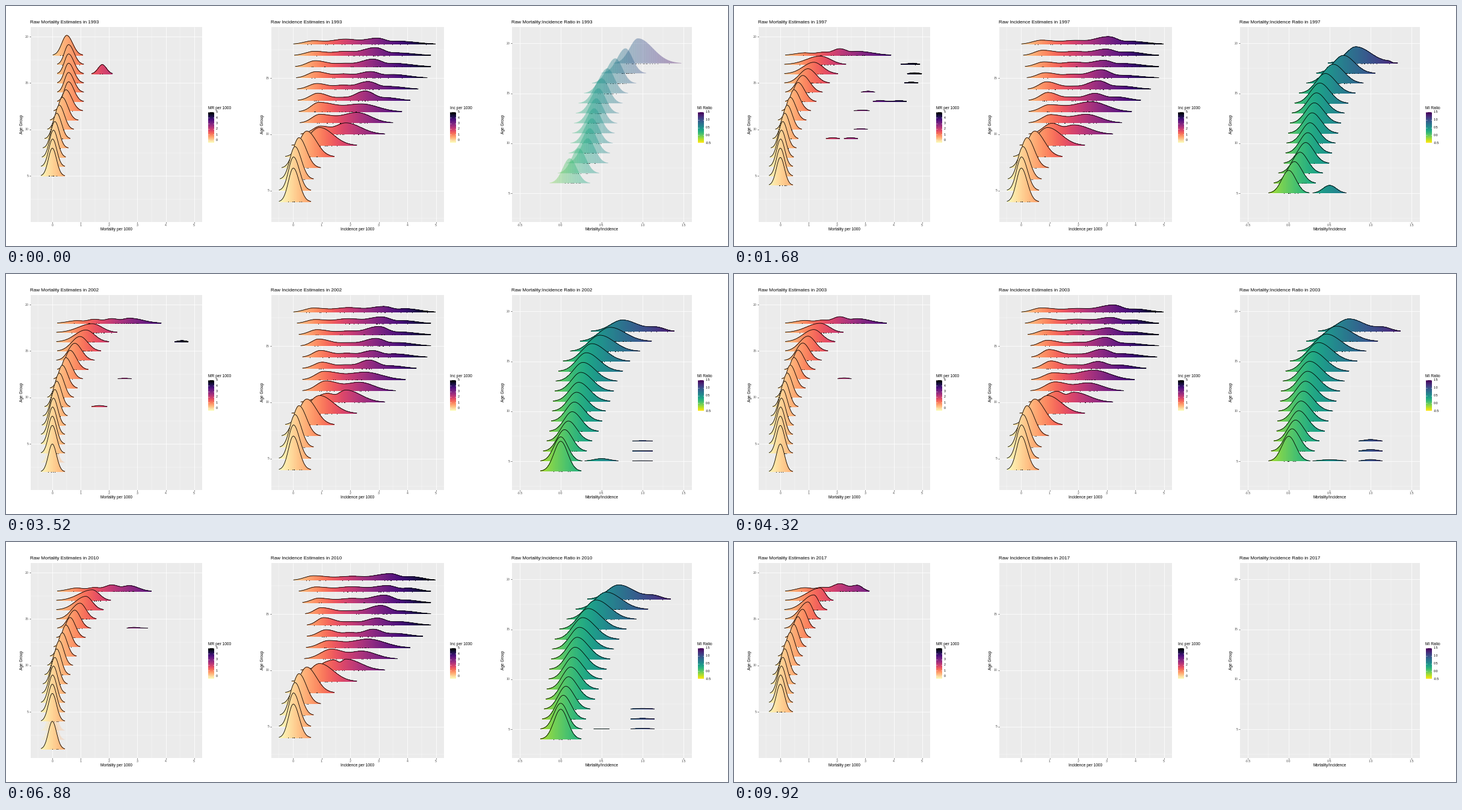
Write a matplotlib script that moves like this. It is 1200x400 px and loops after 10 s.

```python
import numpy as np
import matplotlib
import matplotlib.pyplot as plt
from matplotlib.animation import FuncAnimation
from matplotlib.collections import LineCollection, PolyCollection
from matplotlib.patches import Rectangle

W, H, DPI = 1200, 400, 100
FRAMES, INTERVAL = 125, 80
FIRST, LAST = 1993, 2017
CUT = 0.03  # ridge heights below this are not drawn
TOP, BOTTOM = 35, 360
PT = 72 / DPI
plt.rcParams["font.family"] = "Liberation Sans"

fig = plt.figure(figsize=(W / DPI, H / DPI), dpi=DPI, facecolor="white")
ax = fig.add_axes([0, 0, 1, 1])
ax.axis("off")


def ridge(xs, left, peaks, right):
    """Smooth ridge between two ends through (x, height) peaks; x in stage pixels."""
    total = np.zeros_like(xs)
    for i, (x, h) in enumerate(peaks):
        tail = np.sqrt(2 * np.log(max(h, 0.05) / CUT))
        s_left = 0.45 * (x - peaks[i - 1][0]) if i else (x - left) / tail
        s_right = 0.45 * (peaks[i + 1][0] - x) if i < len(peaks) - 1 else (right - x) / tail
        d = xs - x
        total += (h * np.exp(-0.5 * (d / np.where(d < 0, s_left, s_right)) ** 2)) ** 2
    return np.sqrt(total)


def island(x, h, half=12):
    return x - half, [(x, h)], x + half


def ramp(year, start, end):
    return np.clip((year - start) / (end - start), 0, 1)


def wobble(age, year, k=0, size=0.15):
    """Smooth, repeatable variation from year to year."""
    return 1 + size * np.sin(1.7 * age + 2.3 * k + 0.9 * (year - FIRST))


rng = np.random.default_rng(11)
OUTLIERS = [(age, 1996 + rng.exponential(4), min(125 + 14 * (age - 8) + 80 * rng.random(), 300))
            for age in rng.integers(8, 18, 40)]


def mortality(age, year):
    q = max(age - 5, 0) ** 2
    settled, late = ramp(year, 1993, 1997), ramp(year, 2000, 2017)

    def limit(value, cap):  # the first year shows little spread at high ages
        return min(value, cap) + settled * max(value - cap, 0)

    left = 57 + min(0.45 * q, 27)
    peak = 77 + limit(0.46 * q, 27)
    right = 98 + limit((0.62 - 0.15 * late) * q, 32)
    fall = (0.0145 - 0.003 * late) * q
    height = 3 - limit(fall, 0.85)
    parts = [island(x, 0.15 * (1 - abs(year - born)))
             for a, born, x in OUTLIERS if a == age and abs(year - born) < 1]
    if age == 16:
        parts.append(island(160, 1 - settled, 18))
    if age < 18:
        return parts + [(left, [(peak, height)], right)]
    spread = [(118 + 29 * k, settled * h * wobble(age, year, k, 0.2) * (1 + 0.3 * late))
              for k, h in enumerate((0.25, 0.4, 0.6, 0.45))]
    return parts + [(77, [(101, 2.15 * (1 - settled))], 129), (85, spread, 262 - 36 * late)]


def incidence(age, year):
    cube = (age - 4) ** 3
    if age < 10:
        return [(453 + 0.17 * cube, [(477.5 + 0.35 * cube, 3 - 0.0112 * cube)],
                 507 + 0.62 * cube)]
    u, f = ramp(year, 1993, 2012), (age - 10) / 8
    root = np.sqrt(f)
    left = 490 - 12 * f + 18 * u * np.sin(np.pi * f)
    right = min(630 + (age - 10) * (14 + 8 * u), 706 + 8 * (age == 18))
    low, high = 523 + 25 * u * (1 - f) - 12 * f, 565 + 52 * root + 25 * u * root
    peaks = [(low, 0.85 - 0.5 * f), (high, 0.95 - 0.35 * root)]
    if f > 0.3:
        peaks.insert(1, ((low + high) / 2, 0.25 + 0.15 * f))
        peaks.append((min(high + 36, right - 30), 0.28))
    return [(left, [(x, h * wobble(age, year, k)) for k, (x, h) in enumerate(peaks)], right)]


def ratio(age, year):
    d = max(age - 5, 0)
    bend = max(d - 8, 0) ** 2
    spread = ramp(year, 1994, 2000)
    shift = 34 * np.exp(-(year - FIRST) / 6) * min(d / 3, 1)
    peak = 922 + 3.6 * d + 1.9 * bend + shift
    level = np.interp(year, (1993, 1997, 2000, 2007), (2.5, 2.05, 1.8, 2.2))
    height = level - 0.03 * bend * spread
    height += (3 - level) * np.exp(-0.7 * (age - 4)) * spread
    left = peak - 34 - 1.4 * d * (0.4 + 0.6 * spread)
    right = peak + 35 + 2.9 * d * spread
    peaks = [(peak, height)]
    if age == 18:
        peaks.append((peak + 55, 0.45 * spread))
        right += 14 * spread
    parts = [(left, peaks, right)]
    if age == 5:
        parts.append(island(990, 0.8 * np.exp(-max(year - 1997, 0) / 4), 28))
    if 5 <= age <= 7:
        parts.append(island(1058, 0.17 * ramp(year, 2001, 2003) * (1 - 0.5 * ramp(year, 2004, 2007)), 20))
    return parts


class Panel:
    def __init__(self, left, right, x0, x_unit, y5, y_unit, parts, spans, ages, cmap, limits):
        self.left, self.right = left, right
        self.x0, self.x_unit, self.y5, self.y_unit = x0, x_unit, y5, y_unit
        self.parts, self.spans, self.ages, self.limits = parts, spans, ages, limits
        self.cmap = matplotlib.colormaps[cmap]
        lo, hi = limits
        self.xs = np.arange(left, self.px(hi) + 1, 1.5)
        self.colors = self.cmap(((self.xs - x0) / x_unit - lo) / (hi - lo))
        dots = np.random.default_rng(4)
        self.samples = {a: dots.random(2 + a) for a in ages}

    def px(self, x):
        return self.x0 + x * self.x_unit

    def py(self, y):
        return self.y5 - (y - 5) * self.y_unit

    def alpha(self, age, year):
        """Ridges fade over one year around the spans in which they exist."""
        spans = self.spans.get(age, self.spans[0])
        return max(0, 1 - min(max(a - year, year - b, 0) for a, b in spans))

    def height(self, age, year):
        return np.sqrt(sum(ridge(self.xs, *p) ** 2 for p in self.parts(age, year)))


def label(x, y, s, size, color="black", ha="left", va="center", **kw):
    return ax.text(x, y, s, fontsize=size * PT, color=color, ha=ha, va=va, **kw)


def lines(segments, width, color, z):
    ax.add_collection(LineCollection(segments, linewidths=width * PT, colors=color, zorder=z))


def decorate(p, xticks, yticks, xminor, fmt, xlabel, legend_x, legend_title):
    ax.add_patch(Rectangle((p.left, TOP), p.right - p.left, BOTTOM - TOP, fc="#EBEBEB", lw=0))

    def grid(xv, yv, width):
        lines([[(p.px(x), TOP), (p.px(x), BOTTOM)] for x in xv]
              + [[(p.left, p.py(y)), (p.right, p.py(y))] for y in yv], width, "white", 1.5)

    grid(xminor, np.arange(2.5, 18, 5), 0.4)
    grid(xticks, yticks, 0.8)
    lines([[(p.px(x), BOTTOM), (p.px(x), BOTTOM + 2)] for x in xticks]
          + [[(p.left - 2, p.py(y)), (p.left, p.py(y))] for y in yticks], 0.7, "#333333", 1.5)
    for x in xticks:
        label(p.px(x), 365.5, format(x, fmt), 5.3, "#4D4D4D", "center")
    for y in yticks:
        label(p.left - 3.2, p.py(y), str(y), 5.3, "#4D4D4D", "right")
    label((p.left + p.right) / 2, 373, xlabel, 6.6, ha="center")
    label(p.left - 14.5, 197, "Age Group", 6.6, ha="center", rotation=90)

    label(legend_x - 0.5, 170, legend_title, 6.6)
    lo, hi = p.limits
    ax.imshow(p.cmap(np.linspace(1, 0, 64))[:, None], extent=(legend_x, legend_x + 10, 228, 177),
              aspect="auto", interpolation="bilinear", zorder=2)
    for v in xticks:
        y = 228 - 51 * (v - lo) / (hi - lo)
        lines([[(legend_x, y), (legend_x + 2, y)], [(legend_x + 8, y), (legend_x + 10, y)]],
              0.5, "white", 3)
        label(legend_x + 13, y, format(v, fmt), 5.3)


panels = [
    Panel(40.5, 326, 77, 47.15, 283.2, 15.47, mortality,
          {0: [(1993, 2017)], 4: [(1996, 2016)], 3: [(1998, 2001), (2006, 2009)],
           2: [(1998, 2009)], 1: [(2007.9, 2012.2)]}, range(1, 19), "magma_r", (-0.5, 5)),
    Panel(440.5, 727.5, 477, 47.5, 307.5, 18.75, incidence,
          {0: [(1993, 2012)]}, range(4, 19), "magma_r", (-0.5, 5)),
    Panel(840.5, 1139.5, 922, 136, 312, 16.65, ratio,
          {0: [(1993.55, 2011)], 5: [(1995, 2011)], 4: [(1999, 2002), (2006, 2010)]},
          range(4, 19), "viridis_r", (-0.5, 1.5)),
]
rates, rate_minor = range(6), np.arange(-0.5, 5)
decorate(panels[0], rates, [5, 10, 15, 20], rate_minor, "d", "Mortality per 1000", 336,
         "MR per 1000")
decorate(panels[1], rates, [5, 10, 15], rate_minor, "d", "Incidence per 1000", 738,
         "Inc per 1000")
decorate(panels[2], np.arange(-0.5, 2, 0.5), [5, 10, 15, 20], np.arange(-0.25, 1.5, 0.5), ".1f",
         "Mortality/Incidence", 1149.5, "MI Ratio")
ax.set(xlim=(0, W), ylim=(H, 0))

names = ["Mortality Estimates", "Incidence Estimates", "Mortality:Incidence Ratio"]
titles = [label(p.left, 28.8, "", 7.95, va="baseline") for p in panels]
live = []


def draw_ridge(p, age, year, z):
    alpha = p.alpha(age, year)
    if alpha < 0.1:
        return
    h = p.height(age, year)
    show = h > CUT
    base, xs = p.py(age), p.xs
    top = base - h * p.y_unit
    i = np.flatnonzero(show[:-1] & show[1:])
    low = np.full(len(i), base)
    quads = np.stack([np.column_stack(c) for c in (
        (xs[i], low), (xs[i], top[i]), (xs[i + 1], top[i + 1]), (xs[i + 1], low))], axis=1)
    solid = alpha > 0.999
    live.append(ax.add_collection(PolyCollection(
        quads, facecolors=p.colors[i], linewidths=0, alpha=None if solid else alpha * 0.9,
        antialiaseds=not solid, zorder=z), autolim=False))
    if solid:
        live.extend(ax.plot(xs, np.where(show, top, np.nan), color="black", lw=0.85 * PT,
                            zorder=z + 0.01, scalex=False, scaley=False))
    # observations sit on the baseline, denser under the peaks
    cdf = np.cumsum(np.where(show, h, 0) ** 2)
    dots = np.interp(p.samples[age], cdf / cdf[-1], xs)
    live.extend(ax.plot(dots, np.full(len(dots), base), "s", ms=0.9 * PT, mew=0, color="black",
                        alpha=alpha, zorder=z + 0.02, scalex=False, scaley=False))


def update(frame):
    while live:
        live.pop().remove()
    year = FIRST + (LAST - FIRST) * frame / (FRAMES - 1)
    for p, title, name in zip(panels, titles, names):
        title.set_text(f"Raw {name} in {round(year)}")
        for age in p.ages:
            draw_ridge(p, age, year, 30 - age)
    return []


anim = FuncAnimation(fig, update, frames=FRAMES, interval=INTERVAL, init_func=lambda: [],
                     repeat=True, repeat_delay=0, blit=False)
plt.show()
```
